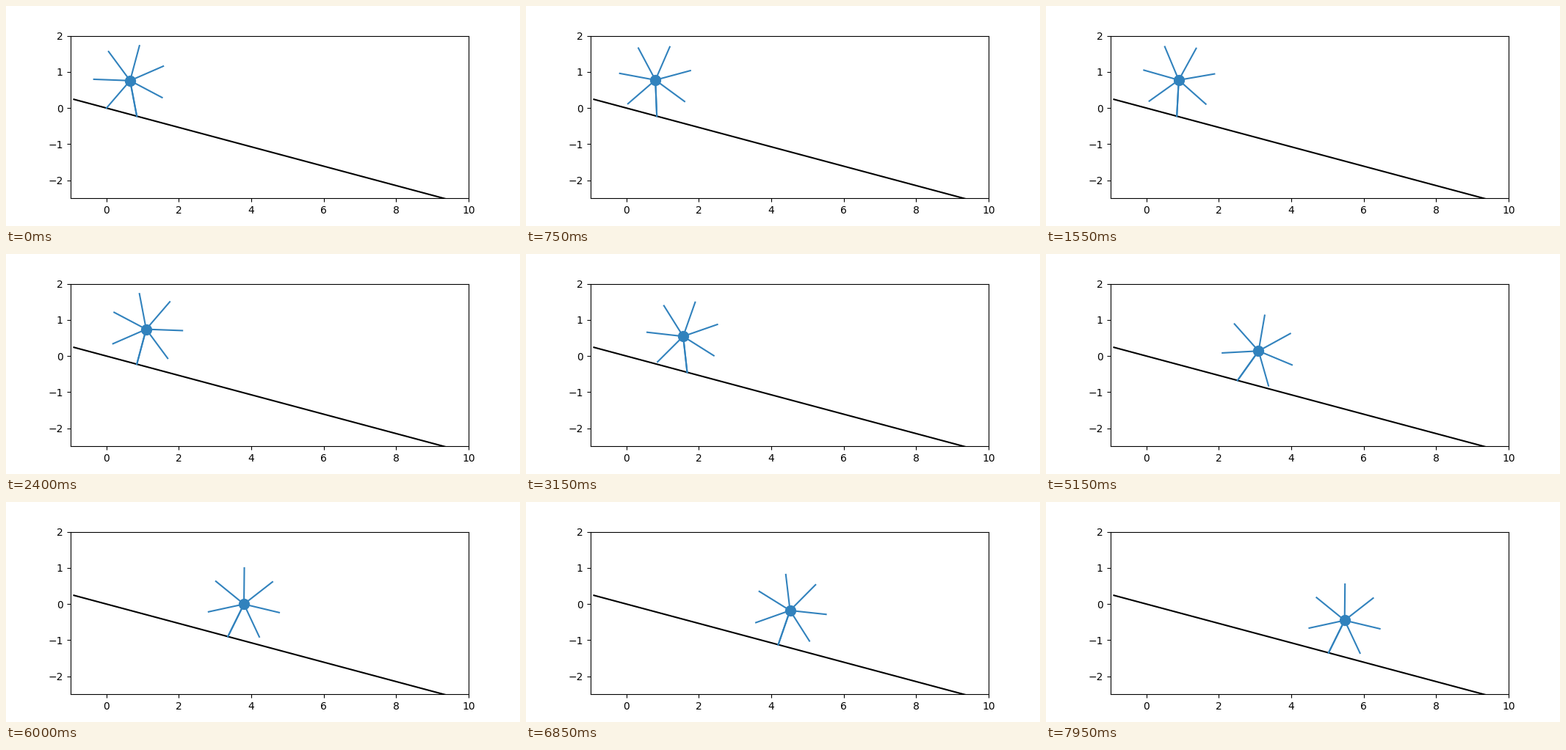
These frames come from a looping animation (700x300 px, 8 s). A matplotlib script:

```python
import numpy as np
import matplotlib.pyplot as plt
from matplotlib.animation import FuncAnimation

FRAMES, INTERVAL = 160, 50
SPEED = 0.5            # simulated seconds per second shown
SPOKES = 7
ALPHA = np.pi / SPOKES
SLOPE = np.radians(15)
GRAVITY = 9.81
SUBSTEPS = 100
BLUE = "#3182bd"

step = 2 * np.sin(ALPHA) * np.array([np.cos(SLOPE), -np.sin(SLOPE)])


def simulate():
    """Pose (stance foot index, stance angle) of the rimless wheel per frame."""
    angle, rate, foot = SLOPE - ALPHA, 0.6238, 1
    dt = SPEED * INTERVAL / 1000 / SUBSTEPS
    poses = []
    for _ in range(FRAMES):
        poses.append((foot, angle))
        for _ in range(SUBSTEPS):
            mid_angle = angle + rate * dt / 2
            mid_rate = rate + GRAVITY * np.sin(angle) * dt / 2
            angle += mid_rate * dt
            rate += GRAVITY * np.sin(mid_angle) * dt
            if angle >= SLOPE + ALPHA:
                angle -= 2 * ALPHA
                rate *= np.cos(2 * ALPHA)
                foot += 1
    return poses


poses = simulate()

fig, ax = plt.subplots(figsize=(7, 3), dpi=100)
ax.set_aspect("equal")
ax.set_xlim(-1, 10)
ax.set_ylim(-2.5, 2)

ramp = np.array([-0.9, 11])
ax.plot(ramp, -np.tan(SLOPE) * ramp, color="black", lw=1.5)
# The stance leg is drawn once more on top of its spoke.
legs = [ax.plot([], [], color=BLUE, lw=1.5)[0] for _ in range(SPOKES + 1)]
hub, = ax.plot([], [], "o", color=BLUE, ms=10)


def update(i):
    foot, angle = poses[i]
    x, y = foot * step + [np.sin(angle), np.cos(angle)]
    for k, leg in enumerate(legs):
        a = angle + 2 * ALPHA * k
        leg.set_data([x, x - np.sin(a)], [y, y - np.cos(a)])
    hub.set_data([x], [y])
    return [*legs, hub]


anim = FuncAnimation(fig, update, frames=FRAMES, interval=INTERVAL,
                     repeat=True, repeat_delay=0)
plt.show()
```
